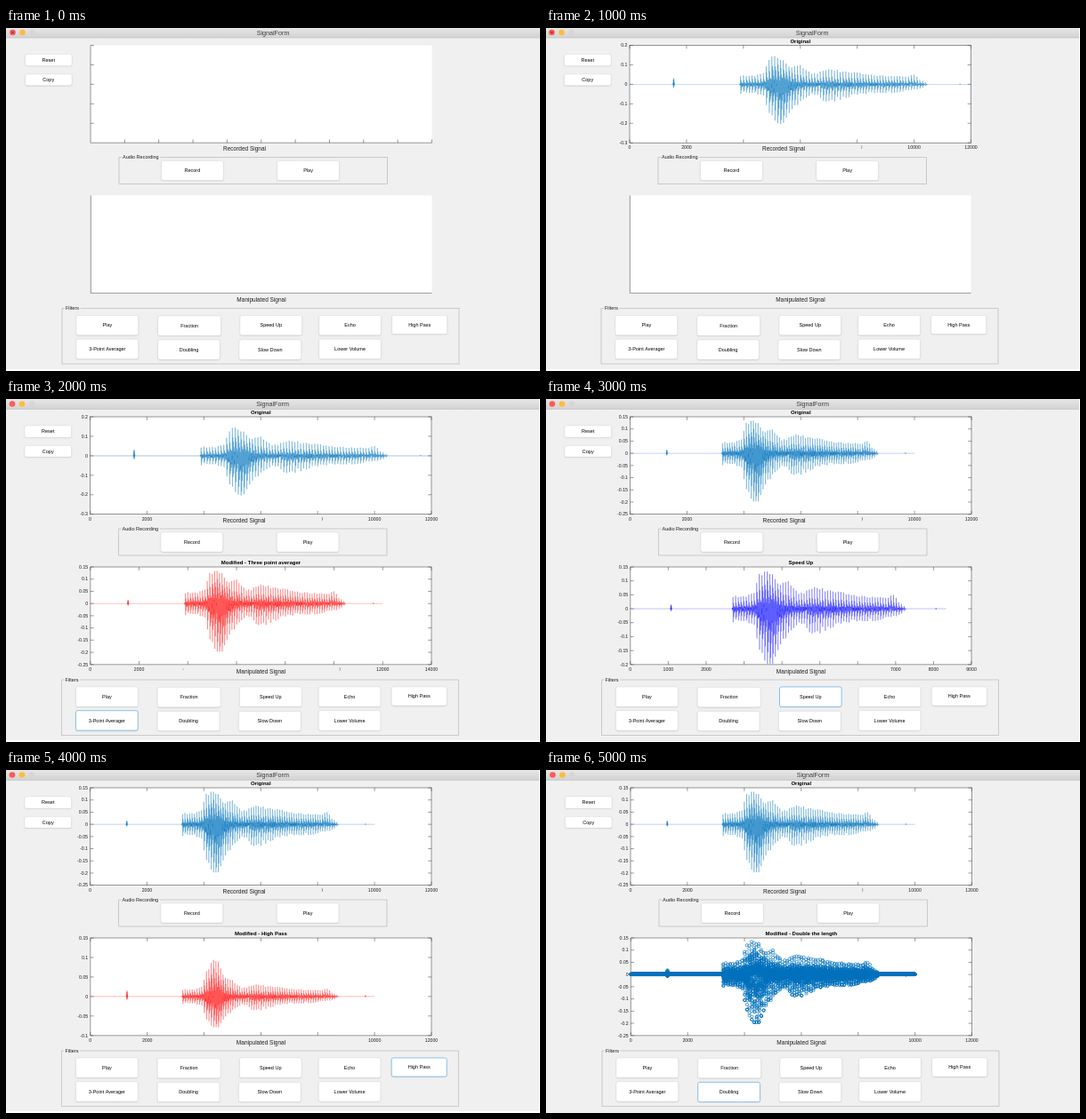
These frames come from a looping animation (600 px wide and 386 px high, 6 s). An HTML page with a canvas:

```html
<!DOCTYPE html>
<html lang="en">
<head>
<meta charset="utf-8">
<title>SignalForm</title>
<style>
  html, body { margin: 0; width: 100%; height: 100%; overflow: hidden; background: #fff; }
  canvas { display: block; width: 600px; height: 386px; }
</style>
</head>
<body>
<canvas id="stage"></canvas>
<script>
const canvas = document.getElementById('stage');
const ctx = canvas.getContext('2d');
const ratio = window.devicePixelRatio || 1;
canvas.width = 600 * ratio;
canvas.height = 386 * ratio;

const BLUE = '#0072bd', RED = '#ff1a1a', INDIGO = '#1a1aff', PANEL = '#f0f0f0';
const TOP = { x: 95, y: 19.5, w: 383.5, h: 109.7, title: 'Original' };
const BOTTOM = { x: 95.3, y: 188.5, w: 383.2, h: 109.8 };

// Loudness of the recording: position, peak above zero, peak below zero (all in thousandths).
const ENVELOPE = [
  [322, 0, 0], [323, 43, 49], [334, 47, 46], [368, 47, 50], [394, 65, 58], [407, 125, 150],
  [417, 165, 172], [438, 125, 205], [449, 125, 203], [459, 111, 172], [472, 102, 135],
  [485, 97, 113], [501, 100, 98], [516, 84, 72], [537, 57, 58], [553, 60, 58], [568, 75, 85],
  [589, 79, 94], [641, 65, 67], [668, 60, 53], [720, 47, 45], [772, 43, 44], [811, 42, 35],
  [829, 56, 28], [850, 28, 26], [871, 5, 5], [875, 0, 0]
];

const BUTTONS = [
  ['Reset', 21.5, 29.5, 52.5, 13.2], ['Copy', 21.5, 52, 52.5, 12.8],
  ['Record', 174.5, 149.5, 69.7, 22], ['Play', 304.7, 149.5, 69.7, 22],
  ['Play', 79, 323.5, 69.7, 22.3], ['Fraction', 170.7, 324, 70.8, 22.3],
  ['Speed Up', 263, 323.5, 69.5, 22.3], ['Echo', 351.7, 323.5, 69.7, 22.3],
  ['High Pass', 433.7, 323.5, 62, 21], ['3-Point Averager', 79, 350.2, 69.7, 22.3],
  ['Doubling', 170.7, 350.9, 69.7, 22.2], ['Slow Down', 262, 350.9, 69.7, 22.2],
  ['Lower Volume', 351.7, 350.2, 69.7, 22.2]
];

const recorded = { xMax: 12000, xStep: 2000, yMin: -.3, yMax: .2, yStep: .1, length: 12000, color: BLUE, kind: 'raw' };
const averaged = { ...recorded, yMin: -.25, yMax: .15, yStep: .05, length: 10000, kind: 'smooth' };

const SCENES = [
  { dx: 0, dy: 0, width: 600, height: 384, hover: true },
  { dx: -1, dy: 0, width: 599, height: 384, hover: true, top: recorded },
  { dx: -.5, dy: .5, width: 599, height: 384, top: recorded, focus: '3-Point Averager',
    bottom: { ...averaged, title: 'Modified - Three point averager', xMax: 14000, length: 12000, color: RED } },
  { dx: -.5, dy: .5, width: 599, height: 385, top: averaged, focus: 'Speed Up',
    bottom: { ...averaged, title: 'Speed Up', xMax: 9000, xStep: 1000, yMin: -.2, length: 8333, color: INDIGO } },
  { dx: -.5, dy: .5, width: 599, height: 384, top: averaged, focus: 'High Pass',
    bottom: { ...averaged, title: 'Modified - High Pass', yMin: -.1, color: RED, kind: 'high' } },
  { dx: 0, dy: .5, width: 600, height: 386, top: averaged, focus: 'Doubling',
    bottom: { ...averaged, title: 'Modified - Double the length', dots: true } }
];

const bell = (u, center, width) => Math.exp(-(((u - center) / width) ** 2));
const hash = n => { const s = Math.sin(n * 12.9898) * 43758.5453; return s - Math.floor(s); };

function envelope(u) {
  const k = u * 1000;
  const i = ENVELOPE.findIndex(point => point[0] > k);
  if (i < 1) return [0, 0];
  const a = ENVELOPE[i - 1], b = ENVELOPE[i];
  const f = (k - a[0]) / (b[0] - a[0]);
  return [1, 2].map(j => (a[j] + (b[j] - a[j]) * f) / 1000);
}

// Voiced speech: a train of decaying pitch pulses, ringing longer around the loud vowel.
function sample(u, kind) {
  let [up, down] = envelope(u);
  const loud = bell(u, .444, .035);
  if (kind !== 'raw') { up = Math.min(up, .138); down = Math.min(down, .197); }
  if (kind === 'high') { up *= .4 + .33 * loud; down *= .4; }
  const pulse = Math.floor(u * 120), phase = u * 120 - pulse;
  let v = Math.exp((1.6 * loud - 3.4) * phase) * Math.cos(phase * Math.PI * 10);
  v += (hash(Math.floor(u * 4000)) - .5) * .24;
  v *= .9 + .1 * hash(pulse);
  v = Math.max(-1, Math.min(1, v < 0 ? v * 1.45 : v));
  const click = (kind === 'raw' ? .036 : .017) * bell(u, .129, .0015) * Math.cos((u - .128) * 7000)
    + .003 * bell(u, .968, .001) * Math.cos(u * 7000);
  return v * (v > 0 ? up : down) + click * (click < 0 ? .5 : 1);
}

function text(str, x, y, size, align = 'center', weight = 'normal', color = '#1c1c1c') {
  ctx.font = `${weight} ${size}px "Liberation Sans", Arial, sans-serif`;
  ctx.textAlign = align;
  ctx.textBaseline = 'middle';
  ctx.fillStyle = color;
  ctx.fillText(str, x, y + .3);
}

function line(x1, y1, x2, y2) {
  ctx.beginPath();
  ctx.moveTo(x1, y1);
  ctx.lineTo(x2, y2);
  ctx.stroke();
}

function rect(x, y, w, h, color) {
  ctx.fillStyle = color;
  ctx.fillRect(x, y, w, h);
}

function axisStyle() {
  ctx.strokeStyle = '#444';
  ctx.lineWidth = .55;
}

function emptyAxes({ x, y, w, h }, ticks) {
  rect(x, y, w, h, '#fff');
  axisStyle();
  line(x, y, x, y + h);
  line(x, y + h, x + w, y + h);
  if (!ticks) return;
  for (let i = 1; i <= 10; i++) line(x + w * i / 10, y + h, x + w * i / 10, y + h - 3.8);
  for (let i = 0; i < 5; i++) line(x, y + h * i / 5, x + 3.8, y + h * i / 5);
}

function chart({ x, y, w, h, title }, plot) {
  const px = v => x + w * v / plot.xMax;
  const py = v => y + h * (plot.yMax - v) / (plot.yMax - plot.yMin);
  rect(x, y, w, h, '#fff');
  axisStyle();
  ctx.strokeRect(x, y, w, h);
  for (let v = 0; v <= plot.xMax; v += plot.xStep) {
    line(px(v), y + h, px(v), y + h - 3.8);
    line(px(v), y, px(v), y + 3.8);
    text(v, px(v), y + h + 5.4, 5.2);
  }
  const rows = Math.round((plot.yMax - plot.yMin) / plot.yStep);
  for (let i = 0; i <= rows; i++) {
    const v = Number((plot.yMax - i * plot.yStep).toFixed(2)) || 0;
    line(x, py(v), x + 3.8, py(v));
    line(x + w, py(v), x + w - 3.8, py(v));
    text(v, x - 2.6, py(v), 5.2, 'right');
  }
  text(plot.title || title, x + w / 2, y - 4.5, 6, 'center', 'bold', '#000');
  ctx.strokeStyle = plot.color;
  (plot.dots ? drawDots : drawWave)(plot, px, py);
}

function drawWave(plot, px, py) {
  const count = 6000;
  ctx.lineWidth = .32;
  ctx.lineJoin = 'bevel';
  ctx.beginPath();
  for (let i = 0; i <= count; i++) {
    const u = i / count;
    ctx.lineTo(px(u * plot.length), py(sample(u, plot.kind)));
  }
  ctx.stroke();
}

function drawDots(plot, px, py) {
  const count = 10000;
  ctx.lineWidth = .65;
  for (let i = 0; i <= count; i++) {
    const u = i / count;
    ctx.beginPath();
    ctx.arc(px(u * plot.length), py(sample(u, plot.kind)) - .3, 1.6, 0, Math.PI * 2);
    ctx.stroke();
  }
}

function group(label, x, y, w, h, labelWidth) {
  ctx.strokeStyle = '#b0b0b0';
  ctx.lineWidth = .6;
  ctx.strokeRect(x, y, w, h);
  rect(x + 3, y - 3, labelWidth, 6, PANEL);
  text(label, x + 4, y, 5.5, 'left');
}

function button([label, x, y, w, h], focused) {
  ctx.beginPath();
  ctx.roundRect(x, y, w, h, 2);
  ctx.save();
  ctx.shadowColor = 'rgba(0,0,0,.22)';
  ctx.shadowBlur = 1.2 * ratio;
  ctx.shadowOffsetY = .4 * ratio;
  ctx.fillStyle = '#fff';
  ctx.fill();
  ctx.restore();
  ctx.strokeStyle = focused ? '#68b2e6' : '#d8d8d8';
  ctx.lineWidth = focused ? .7 : .4;
  ctx.stroke();
  text(label, x + w / 2, y + h / 2, 5.5, 'center', 'normal', '#000');
}

function titleBar(hover) {
  const shade = ctx.createLinearGradient(0, 0, 0, 11);
  shade.addColorStop(0, '#e6e6e6');
  shade.addColorStop(1, '#d2d2d2');
  rect(-2, -2, 604, 13, shade);
  rect(-2, 10.8, 604, .5, '#b6b6b6');
  ['#fc5b57', '#fdbc40', '#d6d6d6'].forEach((color, i) => {
    ctx.beginPath();
    ctx.arc(7.5 + i * 11, 5, 3.3, 0, Math.PI * 2);
    ctx.fillStyle = color;
    ctx.fill();
  });
  if (hover) {
    ctx.strokeStyle = '#7a1412';
    ctx.lineWidth = .7;
    line(6.1, 3.6, 8.9, 6.4);
    line(8.9, 3.6, 6.1, 6.4);
  }
  text('SignalForm', 300, 5.3, 7.2, 'center', 'normal', '#3c3c3c');
}

function drawScene(scene) {
  ctx.setTransform(ratio, 0, 0, ratio, 0, 0);
  rect(0, 0, 600, 386, '#fff');
  ctx.save();
  ctx.beginPath();
  ctx.rect(0, 0, scene.width, scene.height);
  ctx.clip();
  rect(0, 0, 600, 386, PANEL);
  ctx.translate(scene.dx, scene.dy);
  titleBar(scene.hover);

  if (scene.top) chart(TOP, scene.top); else emptyAxes(TOP, true);
  if (scene.bottom) chart(BOTTOM, scene.bottom); else emptyAxes(BOTTOM, false);

  // The caption strips hide the tick labels beneath them.
  rect(199.8, 131, 155.5, 9, PANEL);
  text('Recorded Signal', 268, 136, 6.5);
  rect(199.8, 300.2, 175.4, 10, PANEL);
  text('Manipulated Signal', 287, 306.3, 6.5);

  group('Audio Recording', 127, 145.5, 301.5, 30, 43);
  group('Filters', 63, 315.5, 446, 62.5, 17.5);
  BUTTONS.forEach(item => button(item, item[0] === scene.focus));
  ctx.restore();
}

let shown = -1;
function tick(now) {
  const index = Math.floor(now % 6000 / 1000);
  if (index !== shown) drawScene(SCENES[shown = index]);
  requestAnimationFrame(tick);
}
tick(performance.now());
</script>
</body>
</html>
```
